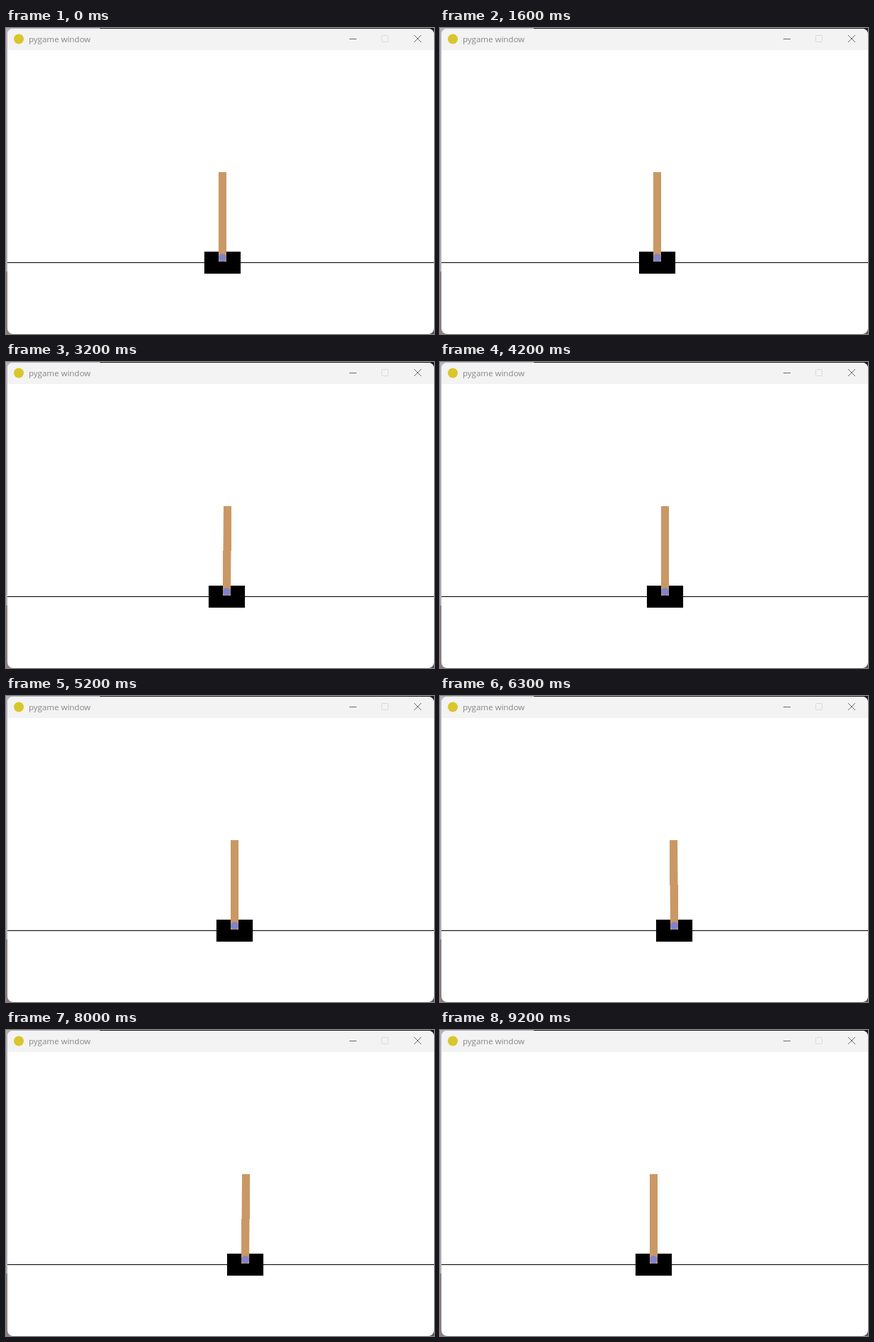
Animation of 602x431 px, one loop 9300 ms. Source, as an HTML page:

```html
<!DOCTYPE html>
<html lang="en">
<head>
<meta charset="utf-8">
<title>pygame window</title>
<style>
  html, body { margin: 0; width: 100%; height: 100%; overflow: hidden; background: #fff; }
  svg { display: block; width: 602px; height: 431px; }
  text { font: 11.5px "Open Sans", "Noto Sans", sans-serif; fill: #868686; }
  .crisp { shape-rendering: crispEdges; }
  .pole { fill: #ca9865; }
</style>
</head>
<body>
<svg viewBox="0 0 602 431">
  <defs>
    <clipPath id="frame"><rect x="2" y="1" width="600" height="430" rx="8"/></clipPath>
  </defs>

  <!-- desktop behind the window -->
  <g class="crisp">
    <rect width="602" height="431" fill="#b4b1bb"/>
    <rect x="132" width="470" height="1" fill="#1e1e22"/>
    <rect x="594" width="8" height="12" fill="#1e1e22"/>
    <rect y="343" width="12" height="88" fill="#8d7f80"/>
    <rect x="590" y="419" width="12" height="12" fill="#55565a"/>
  </g>

  <g clip-path="url(#frame)">
    <rect x="2" y="1" width="600" height="430" fill="#fff"/>
    <rect x="2" y="1" width="600" height="30" fill="#f3f3f3" class="crisp"/>
    <rect x="2" y="330" width="600" height="1" class="crisp"/>
  </g>

  <circle cx="18" cy="15.5" r="7" fill="#d9c62b"/>
  <text x="32" y="20">pygame window</text>
  <g fill="none">
    <path d="M483 15.5h10" stroke="#6a6a6a"/>
    <rect x="528.5" y="10.5" width="9" height="9" rx="1" stroke="#dadada"/>
    <path d="M574 10l10 10M584 10l-10 10" stroke="#6a6a6a"/>
  </g>

  <g id="cart">
    <rect y="315" width="51" height="31" class="crisp"/>
    <rect x="20" y="266" width="11" height="63" class="pole crisp"/>
    <rect id="tip" x="20" y="203" width="11" height="63" class="pole crisp"/>
    <polygon id="slant" class="pole"/>
    <circle cx="25.5" cy="323.5" r="5.5" fill="#8184cb"/>
  </g>
</svg>
<script>
  const TICK = 100, LOOP = 9300;

  // Key points as [tick, pixels]; the cart starts afresh at tick 87.
  const cartPath = [
    [0, 278.5], [12, 278.7], [32, 284.8], [42, 290.8], [45, 291], [55, 298], [63, 304],
    [76, 311], [80, 311.2], [82, 313], [86, 313], [87, 279], [88, 279], [92, 275]
  ];
  const leanPath = [[0, 0.3], [32, 0.9], [52, 0.2], [63, -0.9], [80, 0.9], [86, 0], [92, 0]];

  function along(path, tick) {
    const next = Math.max(1, path.findIndex(([t]) => t >= tick));
    const [[t0, v0], [t1, v1]] = [path[next - 1], path[next]];
    return v0 + (v1 - v0) * (tick - t0) / (t1 - t0);
  }

  const [cart, tip, slant] = ["cart", "tip", "slant"].map(id => document.getElementById(id));
  const begin = performance.now();

  function draw() {
    const tick = Math.floor((performance.now() - begin) % LOOP / TICK);
    // Alternating pushes rock the cart one way and the pole the other.
    const push = tick % 2 ? -0.25 : 0.25;
    const x = Math.round(along(cartPath, tick) + push);
    const lean = Math.round(along(leanPath, tick) - push);
    cart.setAttribute("transform", `translate(${x} 0)`);
    tip.setAttribute("x", 20 + lean);
    slant.setAttribute("points", `${20 + lean},203 ${31 + lean},203 31,329 20,329`);
    requestAnimationFrame(draw);
  }
  draw();
</script>
</body>
</html>
```
